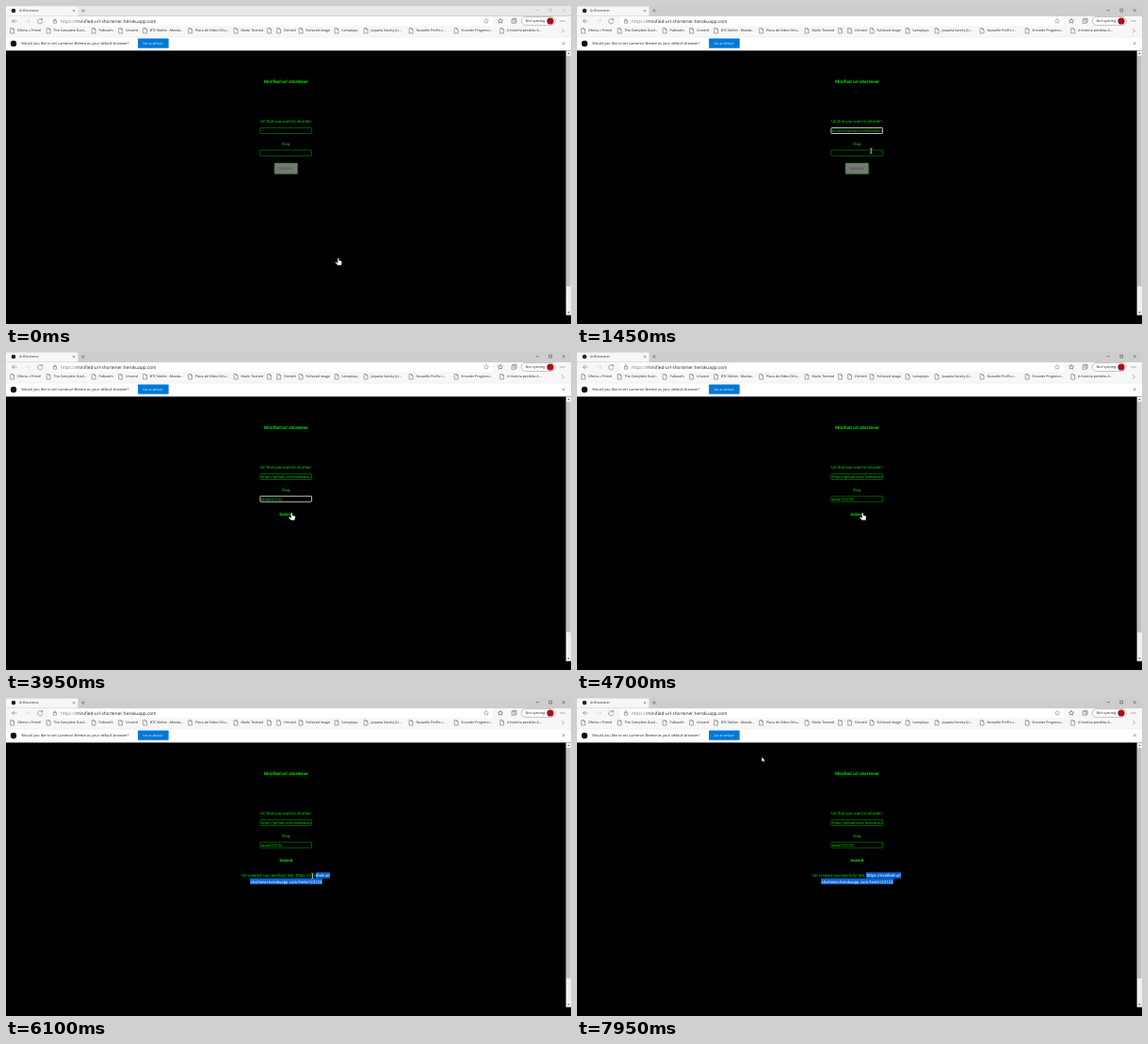
Animation of 600 by 338 pixels, one loop 8000 ms. Source, as an HTML page:

```html
<!DOCTYPE html>
<html lang="en">
<head>
<meta charset="utf-8">
<title>UrlShortener</title>
<style>
html, body { margin: 0; width: 100%; height: 100%; overflow: hidden; background: #000; }
svg { display: block; width: 100vw; height: 100vh; }
text { text-rendering: geometricPrecision; white-space: pre; }
.ui { font-family: "Open Sans", "Noto Sans", sans-serif; }
.page { font-family: Roboto, Arial, sans-serif; fill: #00d800; }
.icon { fill: none; stroke: #555; stroke-width: .5; }
.mid { text-anchor: middle; }
.field { fill: none; }
</style>
</head>
<body>
<svg id="stage" viewBox="0 0 600 338">
  <defs>
    <clipPath id="urlClip"><rect x="270.5" y="129" width="53.8" height="7"/></clipPath>
    <clipPath id="selClip"><rect id="clip1" y="185.3" height="6.4"/><rect id="clip2" y="191.7" height="6.4"/></clipPath>
  </defs>
  <rect width="600" height="338"/>

  <g id="chrome" class="ui">
    <rect id="tabBar" width="600" height="10.5"/>
    <path d="M0 10.5V1.5Q0 .5 1 .5H75.5Q76.5.5 76.5 1.5V10.5Z" fill="#f7f7f7"/>
    <rect y="10.3" width="600" height="22.7" fill="#f7f7f7"/>
    <rect x="46" y="11.3" width="471" height="9.6" rx="1.2" fill="#fff"/>
    <rect y="33" width="600" height="14.4" fill="#fff"/>
    <path d="M0 33H600" stroke="#e4e4e4" stroke-width=".5"/>
    <circle cx="8" cy="5" r="2.3" fill="#222"/>
    <circle cx="8" cy="40" r="3.2" fill="#111"/>
    <g class="icon">
      <path d="M70.8 3.8l2.4 2.4m0-2.4l-2.4 2.4M79.8 5h4M82 3v4"/>
      <path id="controls" d="M562.7 4.6h3.2M576.8 3.2h2.8v2.8h-2.8zM590.9 3.2l2.8 2.8m0-2.8l-2.8 2.8"/>
      <path d="M590.8 38.4l2.8 2.8m0-2.8l-2.8 2.8"/>
      <path d="M11.5 16H6.5m2.2-2.2L6.5 16l2.2 2.2"/>
      <path d="M20.8 16h5m-2.2-2.2l2.2 2.2-2.2 2.2" stroke="#ccc"/>
      <path d="M38.3 14.6A2.6 2.6 0 1 0 38.9 16.4M38.6 13v1.8h-1.8"/>
      <path d="M50.3 15.6h3.2v2.6h-3.2zM51 15.6v-1a.9.9 0 0 1 1.8 0v1"/>
      <path d="M537 14.3h4v4h-4zM538 14.3v-1h4v4h-1M538 16.3h2"/>
      <rect x="547.3" y="11.6" width="36" height="8.8" rx="4.4" fill="#fff" stroke="#888"/>
      <path d="M590.4 24.4l2 2-2 2"/>
    </g>
    <circle cx="578" cy="16" r="3.6" fill="#a80f1c"/>
    <path d="M588.8 16h.1m2 0h.1m2 0h.1" stroke="#333" stroke-width=".8" stroke-linecap="round"/>
    <rect x="140.1" y="34.6" width="32.6" height="10.2" rx=".6" fill="#0078d7"/>
    <rect x="594.6" y="47.4" width="5.4" height="281.2" fill="#f1f1f1"/>
    <rect x="595" y="53" width="4.6" height="245" fill="#c1c1c1"/>
    <path d="M596.2 51l1.2-1.5 1.2 1.5zM596.2 325l1.2 1.5 1.2-1.5z" fill="#555"/>
  </g>

  <g id="page" class="page">
    <rect id="urlBox" class="field" x="269.9" y="129.5" width="54.7" height="6" rx=".7"/>
    <rect id="slugBox" class="field" x="269.9" y="153.2" width="54.7" height="6" rx=".7"/>
    <g clip-path="url(#urlClip)"><text id="url" y="134" font-size="4"></text></g>
    <text id="slug" x="271" y="157.7" font-size="4"></text>
    <rect id="button" x="285.1" y="167" width="24.5" height="11.6" rx=".7" fill="#777" stroke="#00a000" stroke-width=".5"/>
    <text id="submit" class="mid" x="297.3" y="173.9" font-size="4.35" font-weight="700">Submit</text>
    <g id="message"></g>
    <g id="selection">
      <rect id="sel1" y="185.3" height="6.4" fill="#0a63d0"/>
      <rect id="sel2" y="191.7" height="6.4" fill="#0a63d0"/>
      <g id="selText" clip-path="url(#selClip)"></g>
    </g>
  </g>

  <g id="cursor">
    <path id="hand" transform="scale(1.2)" d="M-.9 -3.2q.7-.6 1.1.1v2l2 .5q.7.2.6.9l-.5 2.8h-3.2L-3 .8q.3-.9 1.1-.3l1 .8z" fill="#fff" stroke="#222" stroke-width=".2"/>
    <path id="beam" d="M-1.2-2.7q1 0 1.2.5.2-.5 1.2-.5M0-2.2v4.4M-1.2 2.7q1 0 1.2-.5.2.5 1.2.5" fill="none" stroke="#eee" stroke-width=".7"/>
    <path id="arrow" d="M-.2-2.4v4.7l1.1-1 .7 1.6.7-.3-.7-1.5h1.5z" fill="#fff"/>
  </g>
</svg>
<script>
const LOOP = 8000;
const $ = id => document.getElementById(id);
const el = (parent, tag, attrs, label) => {
  const node = document.createElementNS('http://www.w3.org/2000/svg', tag);
  for (const k in attrs) node.setAttribute(k, attrs[k]);
  if (label) node.textContent = label;
  parent.append(node);
  return node;
};
const set = (id, attrs) => { for (const k in attrs) $(id).setAttribute(k, attrs[k]); };
const show = (id, on) => set(id, { visibility: on ? 'visible' : 'hidden' });
const clamp = (v, a = 0, b = 1) => Math.min(b, Math.max(a, v));

// Browser frame
const ui = (x, y, size, label, fill = '#222') =>
  el($('chrome'), 'text', { x, y, 'font-size': size, fill }, label);
ui(13.7, 6.4, 3.5, 'UrlShortener');
const address = ui(58, 17.8, 4.75, 'https://', '#777');
el(address, 'tspan', { fill: '#222' }, 'minified-url-shortener.herokuapp.com');
ui(551.5, 17.4, 3.8, 'Not syncing');
ui(16.3, 41.3, 3.9, 'Would you like to set Lumenor Breeze as your default browser?');
ui(145.3, 41.1, 3.4, 'Set as default', '#fff');

const bookmarks = [
  [4, 'Oferta » Primel'], [42.5, 'The Complete Guid...'], [90.5, 'Palbooth'], [119, 'Univerd'],
  [145, 'BTC Wallet - Moeda...'], [193, 'Placa de Vídeo Orlu...'], [241.5, 'Marlo Tevined'],
  [277, ''], [287, 'Ormeld'], [310.5, 'Fullsized image'], [348.5, 'lumoplays'],
  [379.5, 'Jaqueta Varsity (LI...'], [427.5, 'Noavelle ProFix c...'],
  [475.5, 'Encoder Progressi...'], [524, 'A história perdida: A...']
];
for (const [x, label] of bookmarks) {
  el($('chrome'), 'path', { class: 'icon', d: `M${x + .7} 23.6h2.5l1.4 1.4v4h-3.9zM${x + 3.2} 23.6v1.4h1.4` });
  ui(x + 8, 27.4, 3.6, label);
}

const star = (cx, cy, stroke) => {
  let d = '';
  for (let i = 0; i < 10; i++) {
    const r = i % 2 ? 1.2 : 2.7, a = i * Math.PI / 5;
    d += `${i ? 'L' : 'M'}${cx + r * Math.sin(a)} ${cy - r * Math.cos(a)}`;
  }
  el($('chrome'), 'path', { fill: 'none', stroke, 'stroke-width': .5, d: d + 'Z' });
};
star(510, 16, '#888');
star(525, 16, '#444');

// Page text
const line = (parent, y, size, label, extra) =>
  el(parent, 'text', { class: 'mid', x: 297.5, y, 'font-size': size, ...extra }, label);
line($('page'), 81.5, 4.85, 'Minified url shortener', { 'font-weight': 700 });
line($('page'), 124, 4.36, 'Url that you want to shorten:');
line($('page'), 147.8, 4.2, 'Slug:');

const SLUG = 'teste123123';
const LINES = ['Url created successfully! link: https://minified-url-', 'shortener.herokuapp.com/' + SLUG];
LINES.forEach((s, i) => {
  line($('message'), 190.2 + i * 6.4, 4.36, s);
  line($('selText'), 190.2 + i * 6.4, 4.36, s, { fill: '#fff' });
});

const URL_TEXT = 'https://github.com/luvenaro/url-shortener';
const KEYS = [1950, 2050, 2150, 2280, 2450, 2850, 2950, 3000, 3200, 3250, 3300];

// Pointer: time, x, y
const PATH = [
  [50, 353.3, 271.8], [850, 310, 133], [1250, 310, 133], [1450, 312.3, 154], [1750, 310.8, 156.5],
  [3500, 310.8, 156.5], [3900, 303.8, 175], [5350, 303.8, 175], [5850, 337, 195],
  [6050, 336, 194.5], [6100, 325.5, 189], [6850, 306.8, 188.5], [7400, 306.8, 188.5], [7950, 196.5, 65.3]
];
const ease = u => u * u * (3 - 2 * u);
const pointer = t => {
  const i = PATH.findIndex(p => p[0] > t);
  if (i === 0) return PATH[0].slice(1);
  if (i < 0) return PATH[PATH.length - 1].slice(1);
  const [t0, x0, y0] = PATH[i - 1], [t1, x1, y1] = PATH[i];
  const u = ease((t - t0) / (t1 - t0));
  return [x0 + (x1 - x0) * u, y0 + (y1 - y0) * u];
};
const shape = t =>
  t < 300 || (t >= 3700 && t < 5450) ? 'hand' :
  (t >= 800 && t < 3600) || (t >= 5750 && t < 7450) ? 'beam' : 'arrow';
const outline = on => on
  ? { stroke: '#fff', 'stroke-width': .75 }
  : { stroke: '#00b000', 'stroke-width': .5 };

function draw(t) {
  const [x, y] = pointer(t);
  set('cursor', { transform: `translate(${x} ${y})` });
  for (const id of ['hand', 'beam', 'arrow']) show(id, id === shape(t));

  // The window gains focus shortly after the start
  const active = t >= 200;
  set('tabBar', { fill: active ? '#cdcdcd' : '#e8e8e8' });
  set('controls', { stroke: active ? '#333' : '#aaa' });

  const onUrl = t >= 900 && t < 1700, onSlug = t >= 1700 && t < 4250;
  set('urlBox', outline(onUrl));
  set('slugBox', outline(onSlug));
  $('url').textContent = t >= 1000 ? URL_TEXT : '';
  set('url', onUrl ? { x: 324, 'text-anchor': 'end' } : { x: 271, 'text-anchor': 'start' });
  $('slug').textContent = SLUG.slice(0, KEYS.filter(k => k <= t).length);

  const on = clamp((t - 1900) / 200);
  set('button', { opacity: 1 - on });
  set('submit', { fill: `rgb(${80 * (1 - on)},${90 + 135 * on},${80 * (1 - on)})` });

  set('message', { opacity: clamp((t - 5050) / 150) });
  show('selection', t >= 6050);
  const start = t < 6080 ? 344 : clamp(x + 3.5, 307, 344);
  for (const id of ['sel1', 'clip1']) set(id, { x: start, width: 344 - start });
  for (const id of ['sel2', 'clip2']) set(id, { x: 259, width: 77 });
}

const begin = performance.now();
function tick(now) {
  draw(Math.max(0, now - begin) % LOOP);
  requestAnimationFrame(tick);
}
draw(0);
requestAnimationFrame(tick);
</script>
</body>
</html>
```
